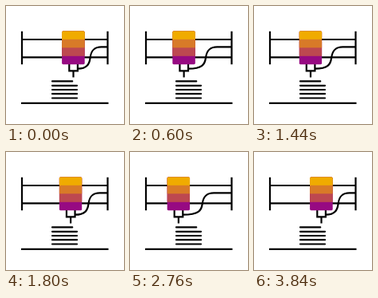
Write an HTML page that moves like this. It is 148x148 px and loops after 5760 ms.

```html
<!DOCTYPE html>
<html lang="en">
<head>
<meta charset="utf-8">
<title>3D printer</title>
<style>
  html, body { margin: 0; width: 100%; height: 100%; overflow: hidden; background: #fff; }
  svg { display: block; width: 100vw; height: 100vh; }
  .line { fill: none; stroke: #000; stroke-width: 2.2; }
  .round { stroke-linecap: round; }
</style>
</head>
<body>
<svg viewBox="0 0 148 148">
  <path class="line" d="M20 42H127.5M20 64.3H127.5"/>
  <path class="line" d="M20 31.7V73.3M127.5 31.7V73.3"/>
  <path class="line round" d="M58 94.4H83.2M58 99.8H89M58 105H89M58 110.2H89M58 115.5H89"/>
  <path class="line" d="M19 121.8H128.5"/>
  <path class="line" id="cable"/>
  <g id="head">
    <path class="line" d="M79.3 72V81.4H89.9V72M84.5 81.4V89.4"/>
    <clipPath id="body"><rect x="70.1" y="31.4" width="28.6" height="41.8" rx="1.6"/></clipPath>
    <g clip-path="url(#body)">
      <rect x="70" y="31" width="29" height="43" fill="#970a82"/>
      <rect x="70" y="31" width="29" height="31.8" fill="#bd4850"/>
      <rect x="70" y="31" width="29" height="21.3" fill="#d87a28"/>
      <rect x="70" y="31" width="29" height="10.8" fill="#f0ab00"/>
    </g>
  </g>
</svg>
<script>
  const LOOP = 5760, MOVING = 3840, SWEEP = 960, TRAVEL = 27, STEP = 40;
  const head = document.getElementById('head');
  const cable = document.getElementById('cable');

  // Distance of the head from its right-hand rest position.
  function shiftAt(ms) {
    const t = Math.floor((ms % LOOP) / STEP) * STEP;
    if (t >= MOVING) return 0;
    const phase = t % (2 * SWEEP);
    return TRAVEL * (1 - Math.abs(phase / SWEEP - 1));
  }

  function draw(ms) {
    const s = shiftAt(ms);
    const start = 90 - s, mid = 105.6 - 0.63 * s, end = 119.5 - 0.61 * s;
    head.setAttribute('transform', `translate(${-s} 0)`);
    cable.setAttribute('d',
      `M${start} 78.7C${mid - 4} 78.7 ${mid - 1} 73 ${mid} 65` +
      `C${mid + 1} 57 ${mid + 4} 51.3 ${end} 51.3H127.5`);
  }

  const origin = performance.now();
  function tick() {
    draw(performance.now() - origin);
    requestAnimationFrame(tick);
  }
  draw(0);
  requestAnimationFrame(tick);
</script>
</body>
</html>
```
